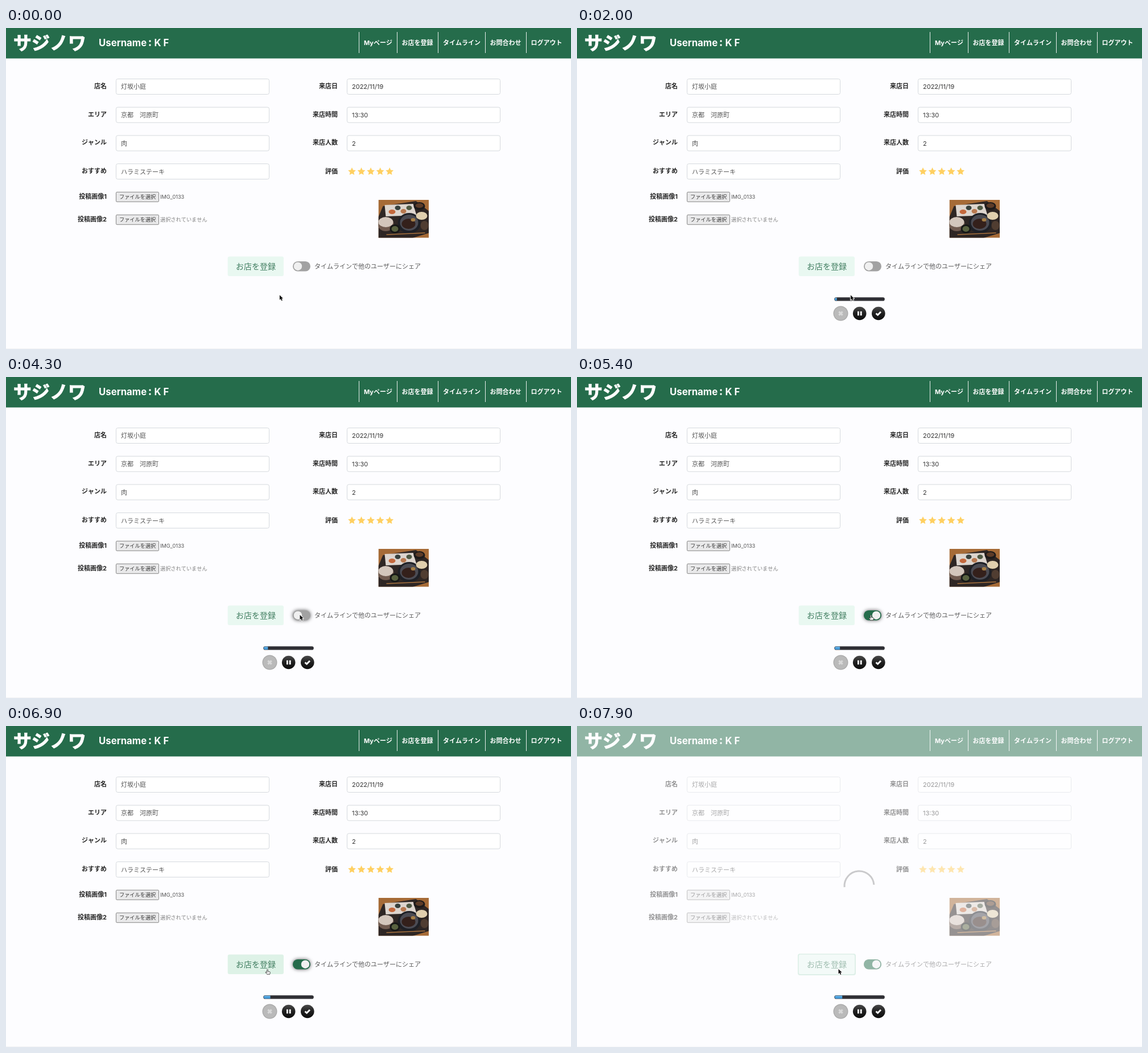
Write an HTML page with a canvas that moves like this. It is 993 px wide and 564 px high and loops after 8 s.

```html
<!DOCTYPE html>
<html lang="ja">
<head>
<meta charset="utf-8">
<style>
html, body { margin: 0; width: 100%; height: 100%; overflow: hidden; background: #fdfdff; }
canvas { display: block; width: 993px; height: 564px; }
</style>
</head>
<body>
<canvas id="stage"></canvas>
<script>
const W = 993, H = 564, LOOP = 8000, STEP = 100;
const FONT = '"Inter", "Noto Sans CJK JP", "Noto Sans CJK", sans-serif';
const GREEN = '#256c4b', PAGE = '#fdfdff';
const canvas = document.getElementById('stage');
const ctx = canvas.getContext('2d');
const dpr = window.devicePixelRatio || 1;
canvas.width = W * dpr;
canvas.height = H * dpr;

const clamp = v => Math.max(0, Math.min(1, v));
const ease = (t, a, b) => { const p = clamp((t - a) / (b - a)); return p * p * (3 - 2 * p); };
const mix = (a, b, p) => a + (b - a) * p;

// y is the optical middle of the line
function text(str, x, y, size, color, weight = 400, align = 'left') {
  ctx.font = `${weight} ${size}px ${FONT}`;
  ctx.textAlign = align;
  ctx.fillStyle = color;
  ctx.fillText(str, x, y + size * 0.38);
}

function box(x, y, w, h, r, fill, stroke) {
  ctx.beginPath();
  ctx.roundRect(x, y, w, h, r);
  if (fill) { ctx.fillStyle = fill; ctx.fill(); }
  if (stroke) { ctx.strokeStyle = stroke; ctx.lineWidth = 1; ctx.stroke(); }
}

function disc(x, y, r, fill, ry = r) {
  ctx.beginPath();
  ctx.ellipse(x, y, r, ry, 0, 0, Math.PI * 2);
  ctx.fillStyle = fill;
  ctx.fill();
}

function poly(points, fill) {
  ctx.beginPath();
  points.forEach(([x, y]) => ctx.lineTo(x, y));
  ctx.closePath();
  ctx.fillStyle = fill;
  ctx.fill();
}

function line(points, color, width) {
  ctx.beginPath();
  points.forEach(([x, y]) => ctx.lineTo(x, y));
  ctx.strokeStyle = color;
  ctx.lineWidth = width;
  ctx.stroke();
}

function header() {
  ctx.fillStyle = GREEN;
  ctx.fillRect(0, 0, W, 53.5);
  text('サジノワ', 13, 25.5, 32, '#fff', 900);
  ctx.strokeStyle = '#fff';
  ctx.lineWidth = 1;
  ctx.strokeText('サジノワ', 13, 25.5 + 32 * 0.38);
  text('Username', 163, 25.5, 16.8, '#fff', 700);
  disc(253, 23, 1.7, '#fff');
  disc(253, 30, 1.7, '#fff');
  text('K F', 260.5, 25.5, 16.8, '#fff', 700);
  const menu = [['Myページ', 620.5], ['お店を登録', 687], ['タイムライン', 759.5], ['お問合わせ', 842], ['ログアウト', 914]];
  for (const [label, x] of menu) {
    ctx.fillStyle = '#e6eeea';
    ctx.fillRect(Math.floor(x), 7, 1, 37);
    text(label, x + 8.5, 26, 11, '#fff', 700);
  }
}

function field(label, value, right, row) {
  const x = right ? 599.5 : 193.5, y = 89.5 + row * 49.7;
  text(label, x - 16.5, y + 12.3, 11, '#262626', 700, 'right');
  box(x, y, 269, 27, 3, '#fff', '#d5d9dd');
  text(value, x + 8.5, y + 13.8, 11, right ? '#333' : '#555');
}

function fileRow(label, name, y, color) {
  text(label, 177, y - 0.5, 11, '#262626', 700, 'right');
  box(193.5, y - 8.5, 75, 17, 1.5, '#e9e9ea', '#868686');
  text('ファイルを選択', 199, y, 9.2, '#333');
  text(name, 271, y, 9.2, color);
}

function star(cx, cy) {
  const pts = [];
  for (let i = 0; i < 10; i++) {
    const a = i * Math.PI / 5 - Math.PI / 2, r = i % 2 ? 3.5 : 7.2;
    pts.push([cx + r * Math.cos(a), cy + r * Math.sin(a)]);
  }
  poly(pts, '#ffd061');
}

function meal() {
  ctx.save();
  ctx.beginPath();
  ctx.rect(654.5, 302, 88.5, 66.5);
  ctx.clip();
  ctx.translate(654.5, 302);
  ctx.fillStyle = '#a66b37';
  ctx.fillRect(0, 0, 89, 67);
  poly([[8, 11], [66, 2], [89, 20], [89, 58], [60, 67], [0, 67], [0, 30]], '#2e2624');
  poly([[11, 9], [61, 7], [67, 27], [13, 29]], '#ddd5ce');
  disc(24, 21, 6, '#c4683c', 4);
  disc(34, 14, 5, '#38423e', 4);
  disc(44, 20, 5, '#b87950', 4);
  disc(54, 14, 5, '#4f5a44', 4);
  disc(72, 11, 10, '#1d1a1a', 7);
  disc(72, 10, 7, '#5d3c28', 4);
  disc(13, 43, 14, '#705a4f', 12);
  disc(13, 39, 13, '#d3c6bc', 9);
  disc(54, 41, 20, '#1e2026', 18);
  disc(54, 40, 16, '#4b4b53', 14);
  disc(53, 42, 12, '#34201b', 9);
  disc(61, 35, 4, '#a57e45', 3);
  disc(76, 28, 10, '#e0cfae', 7);
  disc(29, 51, 9, '#171817', 8);
  disc(29, 51, 6, '#58613f', 5);
  disc(81, 45, 7, '#503d31', 8);
  line([[14, 61], [82, 58]], '#a9733f', 1.4);
  ctx.restore();
}

function registerButton(hover, focus) {
  if (focus) box(388, 400, 102, 38, 4, '#bfe2d1');
  box(389.7, 401.6, 98.3, 34.4, 3, hover ? '#def2e7' : '#e9f8f1');
  text('お店を登録', 404, 419, 14, '#437f62');
}

function toggle(on, glow) {
  ctx.save();
  if (glow) {
    ctx.shadowColor = 'rgba(0,0,0,.65)';
    ctx.shadowBlur = 6 * dpr;
  }
  box(504, 410, 31, 17.5, 8.75, '#a2a2a2');
  ctx.restore();
  ctx.globalAlpha = on;
  box(504, 410, 31, 17.5, 8.75, GREEN);
  ctx.globalAlpha = 1;
  disc(mix(513, 526, on), 418.7, 7.2, '#f0f0f0');
  text('タイムラインで他のユーザーにシェア', 542, 419, 11, '#5a5a5a');
}

function spinner(t) {
  const turn = (t - 7900) / 800 * Math.PI * 2 - 0.08;
  ctx.beginPath();
  ctx.arc(496, 281, 26, Math.PI + turn, Math.PI * 2 + turn);
  ctx.strokeStyle = '#cacacc';
  ctx.lineWidth = 3;
  ctx.stroke();
}

function recorder(t) {
  box(452.3, 473.2, 88.5, 6.3, 3.1, '#2f2f34');
  const bar = ctx.createLinearGradient(0, 473, 0, 480);
  bar.addColorStop(0, '#76bdec');
  bar.addColorStop(1, '#2583ca');
  box(453, 473.8, 0.4 + t * 0.00162, 5.2, [2.5, 0.5, 0.5, 2.5], bar);

  const y = 501.5;
  disc(463.5, y, 13, '#aaa');
  disc(463.5, y, 11.6, '#bababa');
  line([[460.4, y - 3.1], [466.6, y + 3.1]], '#d8d8d8', 3.2);
  line([[466.6, y - 3.1], [460.4, y + 3.1]], '#d8d8d8', 3.2);

  const dark = ctx.createLinearGradient(0, y - 12, 0, y + 12);
  dark.addColorStop(0, '#4b4b4b');
  dark.addColorStop(0.5, '#202020');
  dark.addColorStop(1, '#0c0c0c');
  disc(496.7, y, 11.8, dark);
  disc(529.8, y, 11.8, dark);
  ctx.fillStyle = '#fff';
  ctx.fillRect(493, y - 3.7, 2.8, 7.4);
  ctx.fillRect(497.8, y - 3.7, 2.8, 7.4);
  line([[525.5, y], [528.5, y + 2.8], [534, y - 2.8]], '#fff', 2.9);
}

function pointer(x, y, hand) {
  ctx.save();
  ctx.translate(x, y);
  ctx.scale(0.85, 0.85);
  ctx.lineJoin = 'round';
  const shape = new Path2D(hand
    ? 'M-1 1.2Q0-.5 1 1.2V5L5 5.8Q6 6.2 5.8 7.5L4.8 11H-.7L-4 7Q-4.2 5.5-2.8 6L-1 7.4Z'
    : 'M0 0V10L2.3 7.9L4 11.7L5.8 10.9L4.2 7.2H7.2Z');
  ctx.strokeStyle = hand ? '#333' : '#fff';
  ctx.lineWidth = hand ? 1 : 2.2;
  ctx.fillStyle = hand ? '#fff' : '#111';
  if (!hand) ctx.stroke(shape);
  ctx.fill(shape);
  if (hand) {
    ctx.stroke(shape);
    line([[1, 7.5], [1, 9.3]], '#777', 0.6);
    line([[3, 7.5], [3, 9.3]], '#777', 0.6);
  }
  ctx.restore();
}

function draw(t) {
  const toToggle = ease(t, 3200, 4100), toButton = ease(t, 5600, 6500);
  const x = mix(mix(480.9, 516.5, toToggle), 459.5, toButton);
  const y = mix(mix(469.2, 418, toToggle), 427, toButton);
  const loading = t >= 7300;
  const overToggle = x >= 504 && y < 428;
  const overButton = x < 488 && y < 436 && t > 5000;

  ctx.setTransform(dpr, 0, 0, dpr, 0, 0);
  ctx.fillStyle = PAGE;
  ctx.fillRect(0, 0, W, H);
  ctx.fillStyle = '#f3f3f5';
  ctx.fillRect(0, 563, W, 1);
  header();
  [['店名', '灯坂小庭'], ['エリア', '京都　河原町'], ['ジャンル', '肉'], ['おすすめ', 'ハラミステーキ']]
    .forEach(([label, value], i) => field(label, value, false, i));
  [['来店日', '2022/11/19'], ['来店時間', '13:30'], ['来店人数', '2']]
    .forEach(([label, value], i) => field(label, value, true, i));
  text('評価', 583, 252, 11, '#262626', 700, 'right');
  for (let i = 0; i < 5; i++) star(608 + i * 16.55, 252.3);
  fileRow('投稿画像1', 'IMG_0133', 296.8, '#555');
  fileRow('投稿画像2', '選択されていません', 336.8, '#808080');
  meal();
  registerButton(overButton && !loading, loading);
  toggle(ease(t, 4700, 5000), !loading && (overToggle || t >= 4700));

  if (loading) {
    ctx.globalAlpha = 0.5;
    ctx.fillStyle = PAGE;
    ctx.fillRect(0, 0, W, H);
    ctx.globalAlpha = 1;
    spinner(t);
  }
  if (t >= 100) recorder(t);
  pointer(x, y, t >= 4600 && !loading && (overToggle || overButton));
}

const start = performance.now();
function tick() {
  const t = (performance.now() - start) % LOOP;
  draw(Math.floor(t / STEP) * STEP);
  requestAnimationFrame(tick);
}
tick();
</script>
</body>
</html>
```
